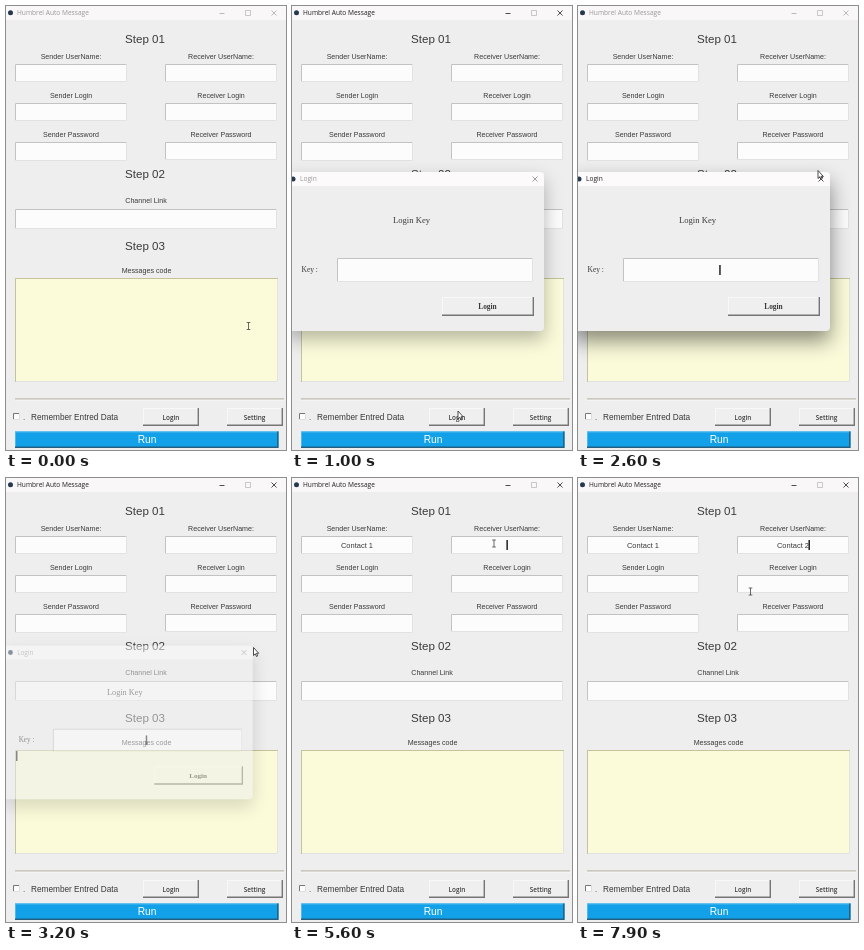
Animation of 280 by 444 pixels, one loop 8000 ms. Source, as an HTML page:

```html
<!DOCTYPE html>
<html lang="en">
<head>
<meta charset="utf-8">
<title>Auto Message form</title>
<style>
  html, body { margin: 0; width: 280px; height: 444px; overflow: hidden; background: #eee; }
  svg { display: block; }
  text { font-family: "Liberation Sans", Arial, sans-serif; fill: #3a3a3a; white-space: pre; }
  .ui { font-family: "Open Sans", "Noto Sans", sans-serif; }
  .serif { font-family: "Liberation Serif", serif; }
  .bold { font-weight: 600; }
  #dialog { filter: drop-shadow(0 8px 9px rgba(0, 0, 0, .28)); }
  #dialog.active { filter: drop-shadow(0 10px 10px rgba(0, 0, 0, .45)); }
</style>
</head>
<body>
<svg id="stage" width="280" height="444" viewBox="0 0 280 444"></svg>
<script>
const stage = document.getElementById('stage');

const rect = (x, y, w, h, fill, extra = '') =>
  `<rect x="${x}" y="${y}" width="${w}" height="${h}" fill="${fill}" ${extra}/>`;
const line = (d, color, width = 1, extra = '') =>
  `<path d="${d}" fill="none" stroke="${color}" stroke-width="${width}" ${extra}/>`;
const label = (s, x, y, size, cls = '', anchor = 'middle', extra = '') =>
  `<text x="${x}" y="${y}" font-size="${size}" class="${cls}" text-anchor="${anchor}" ${extra}>${s}</text>`;

// Box with one colour on the top and left edges, another on the bottom and right
const bevel = (x, y, w, h, fill, light, dark, thick = 1) =>
  rect(x, y, w, h, fill) +
  line(`M${x + .5} ${y + h}V${y + .5}H${x + w}`, light) +
  line(`M${x} ${y + h - thick / 2}H${x + w - thick / 2}V${y}`, dark, thick);
const entry = ([x, y, w, h], fill = '#fcfcfc') => bevel(x, y, w, h, fill, '#c2c2c2', '#e2e2e2');
const button = (x, y, w, h) => bevel(x, y, w, h, '#efefef', '#f8f8f8', '#757575', 1.4);

const cross = (x, y, id) =>
  line(`M${x - 2.5} ${y - 2.5}l5 5m0 -5l-5 5`, '#222', .8, `id="${id}"`);
const caret = (id, x, y) => rect(x, y, 1.5, 10, '#222', `id="${id}"`);

const fields = [
  [9, 58, 112, 18], [9, 97, 112, 18], [9, 136, 112, 19],
  [159, 58, 112, 18], [159, 97, 112, 18], [159, 136, 112, 18],
  [9, 203, 262, 20], [9, 272, 263, 104]
];
const keyField = [45, 252, 196, 24];

const mainWindow =
  rect(0, 0, 280, 444, '#eeeeee') + rect(0, 0, 280, 14, '#faf7f8') +
  '<circle cx="4.5" cy="6.8" r="2.5" fill="#24384f"/>' +
  label('Humbrel Auto Message', 11, 9.2, 6.6, 'ui', 'start', 'id="title"') +
  line('M213.500 7.500h5', '#222', .8, 'id="minimise"') +
  line('M239.500 4.500h5v5h-5z', '#bbb', .8) + cross(268, 7, 'close') +
  fields.map((f, i) => entry(f, i === 7 ? '#fbfbda' : undefined)).join('') +
  line('M9.500 376V272.500H272', '#c3c39c') +
  ['UserName:', 'Login', 'Password'].map((s, i) =>
    label('Sender ' + s, 65, 52.6 + i * 39, 7.1) +
    label('Receiver ' + s, 215, 53.1 + i * 38.8, 7.1)).join('') +
  label('Step 01', 139, 37, 11.6) + label('Step 02', 139, 171.6, 11.6) +
  label('Step 03', 139, 244, 11.6) +
  label('Channel Link', 140, 197, 7.1) + label('Messages code', 140.5, 266.7, 7.1) +
  line('M9 393H278', '#a8a38f', 1.2) + line('M9 394.200H278', '#fafafa') +
  bevel(7, 407, 7, 7, '#fff', '#777', '#ddd') + label('.', 18, 414, 8) +
  label('Remember Entred Data', 25, 414, 8.25, '', 'start') +
  button(137, 402, 56, 18) + label('Login', 165, 413.6, 6.4, 'ui bold') +
  button(221, 402, 56, 18) + label('Setting', 248.500, 413.6, 6.4, 'ui bold') +
  bevel(9, 425.5, 263.5, 16.5, '#12a1e9', '#4db9ee', '#225f82', 1.4) +
  `<text x="141" y="437.300" font-size="10.2" text-anchor="middle" style="fill:#fff">Run</text>` +
  label('', 65, 69.7, 7.5, '', 'middle', 'id="sender"') +
  label('', 215, 69.7, 7.5, '', 'middle', 'id="receiver"') +
  caret('senderCaret', 65, 62) + caret('receiverCaret', 215, 62) +
  caret('messageCaret', 10, 273);

const dialogWindow = '<g id="dialog">' +
  rect(-6, 166, 258, 159, '#efeeef', 'rx="4"') +
  '<path d="M-6 180V170q0-4 4-4H248q4 0 4 4V180z" fill="#fcfafb"/>' +
  '<circle cx="1" cy="173" r="2.5" fill="#24384f"/>' +
  label('Login', 8, 175.4, 6.6, 'ui', 'start', 'id="dialogTitle"') +
  cross(243, 173, 'dialogClose') +
  label('Login Key', 119.5, 217, 8.6, 'serif') +
  label('Key :', 9.5, 266.3, 7.5, 'serif', 'start') +
  entry(keyField) + button(150, 291, 92, 19) +
  label('Login', 195.5, 303, 7.4, 'serif bold') +
  caret('keyCaret', 141.2, 259) + '</g>';

const pointer =
  '<path id="arrow" d="M0 0V8L1.800 6.300L3 9L4.200 8.400L3 5.800H5.200z" fill="#fff" stroke="#222" stroke-width=".8"/>' +
  line('M-1.800 -3.500H1.800M0 -3.500V3.500M-1.800 3.500H1.800', '#444', .8, 'id="beam"');

stage.innerHTML = mainWindow + dialogWindow + pointer;
const ids = Object.fromEntries([...stage.querySelectorAll('[id]')].map(e => [e.id, e]));

// Pointer stops: time, x, y
const path = [
  [0, 242.5, 320], [100, 241, 322], [200, 241, 322], [900, 166, 405], [1200, 166, 405],
  [1700, 150, 264], [1800, 150, 264], [2050, 198, 294], [2100, 198, 294], [2600, 240, 164.5],
  [2900, 247.5, 169.5], [3200, 247.5, 169.5], [3600, 74, 66.5], [5000, 74, 66.5],
  [5500, 202, 65.5], [7600, 202, 65.5], [7900, 172.5, 113.5], [8000, 172.5, 113.5]
];
const senderKeys = Array.from({ length: 9 }, (_, i) => 4200 + i * 100);
const receiverKeys = [6100, 6400, 6500, 6600, 6800, 6900, 7000, 7100, 7300];

function pointerAt(t) {
  const i = path.findIndex(p => p[0] > t);
  const [t0, x0, y0] = path[i - 1], [t1, x1, y1] = path[i];
  const u = (t - t0) / (t1 - t0), e = u * u * (3 - 2 * u);
  return [x0 + (x1 - x0) * e, y0 + (y1 - y0) * e];
}

const between = (t, a, b) => t >= a && t < b;
const inside = (x, y, [l, top, w, h]) => x >= l && x <= l + w && y >= top && y <= top + h;
const show = (el, on) => el.setAttribute('visibility', on ? 'inherit' : 'hidden');

function type(el, caretEl, full, keys, t, caretOn) {
  el.textContent = full.slice(0, keys.filter(k => k <= t).length);
  const half = el.textContent ? el.getComputedTextLength() / 2 : 0;
  caretEl.setAttribute('x', +el.getAttribute('x') + half - .6);
  show(caretEl, caretOn);
}

function draw(t) {
  const mainActive = between(t, 800, 1200) || t >= 3100;
  ids.title.style.fill = mainActive ? '#222' : '#999';
  for (const el of [ids.minimise, ids.close])
    el.setAttribute('stroke', mainActive ? '#222' : '#aaa');

  const dialogActive = between(t, 1200, 3100);
  ids.dialog.classList.toggle('active', dialogActive);
  ids.dialogTitle.style.fill = dialogActive ? '#222' : '#999';
  ids.dialogClose.setAttribute('stroke', dialogActive ? '#222' : '#888');
  const open = between(t, 900, 3300);
  const shown = t < 1000 ? .6 : t < 3100 ? 1 : t < 3200 ? .75 : .5;
  const scale = 1 - (1 - shown) * .07;
  show(ids.dialog, open);
  ids.dialog.setAttribute('opacity', shown);
  ids.dialog.setAttribute('transform',
    `translate(100 215) scale(${scale}) translate(-100 -215)`);

  show(ids.keyCaret, open && (between(t, 1700, 2300) || t >= 2500));
  show(ids.messageCaret, between(t, 3100, 3600));
  type(ids.sender, ids.senderCaret, 'Contact 1', senderKeys, t,
    between(t, 3600, 3900) || between(t, 4200, 5500));
  type(ids.receiver, ids.receiverCaret, 'Contact 2', receiverKeys, t,
    between(t, 5500, 5900) || t >= 6100);

  const [x, y] = pointerAt(t);
  const overDialog = open && inside(x, y, [-6, 166, 258, 159]);
  const text = (overDialog ? [keyField] : fields).some(f => inside(x, y, f));
  for (const el of [ids.arrow, ids.beam])
    el.setAttribute('transform', `translate(${x} ${y})`);
  show(ids.arrow, !text);
  show(ids.beam, text);
}

// The screen refreshes ten times a second
const start = performance.now();
function tick() {
  draw(Math.floor((performance.now() - start) % 8000 / 100) * 100);
  requestAnimationFrame(tick);
}
tick();
</script>
</body>
</html>
```
